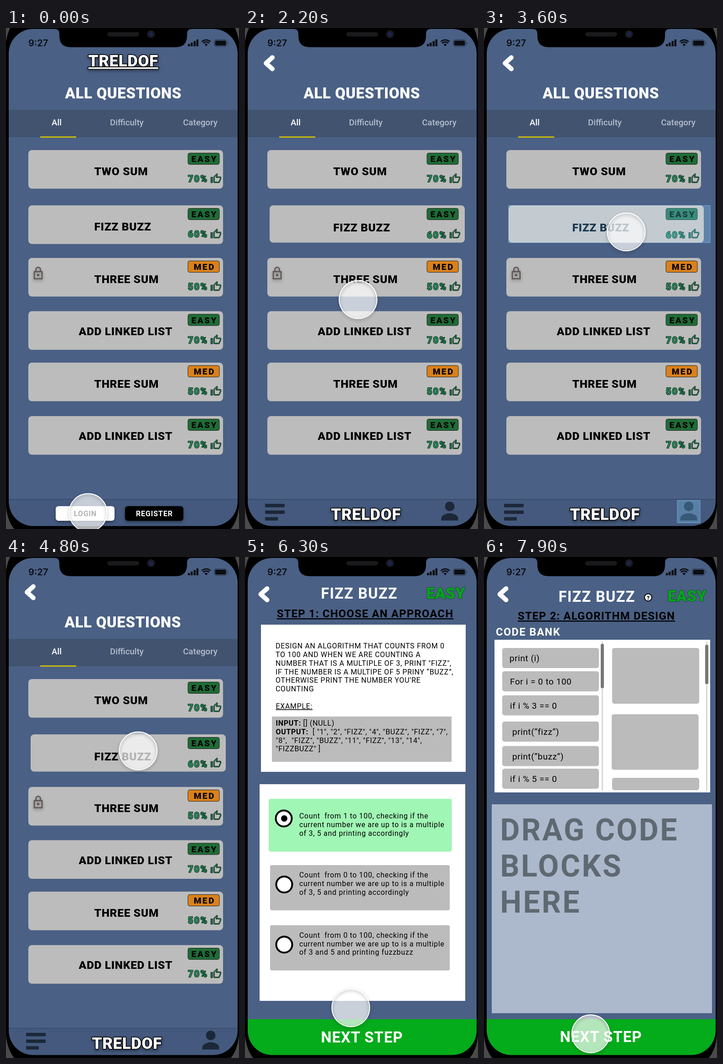
An HTML page for the animation above (8 s loop, 511 px wide and 1096 px high).

```html
<!DOCTYPE html>
<html lang="en">
<head>
<meta charset="utf-8">
<title>Coding practice app</title>
<style>
  html, body { margin: 0; width: 100%; height: 100%; overflow: hidden; background: #000; }
  svg { display: block; width: 100vw; height: 100vh; }
  text { font-family: Roboto, sans-serif; font-weight: 700; white-space: pre; }
  .reg { font-weight: 400; }
  .mid { font-weight: 500; }
  .black { font-weight: 900; }
  .line { text-decoration: underline; }
  .outline { paint-order: stroke; stroke: #000; stroke-linejoin: round; }
  .shadow { filter: drop-shadow(0 3px 3px #0006); }
  #hints { mix-blend-mode: screen; }
</style>
</head>
<body>
<svg id="stage" viewBox="0 0 511 1096" preserveAspectRatio="none"></svg>
<script>
const BLUE = '#4a6085', GREY = '#bbb', GREEN = '#04ab1b', BRAND = 'TRELDOF';

const rect = (x, y, x2, y2, fill, r = 0, extra = '') =>
  `<rect x="${x}" y="${y}" width="${x2 - x}" height="${y2 - y}" rx="${r}" fill="${fill}" ${extra}/>`;

const text = (x, y, size, str, { fill = '#000', gap = 0, cls = '', mid = false, extra = '' } = {}) =>
  `<text x="${mid ? x + gap / 2 : x}" y="${y}" font-size="${size}" fill="${fill}" letter-spacing="${gap}"
    class="${cls}" ${mid ? 'text-anchor="middle"' : ''} ${extra}>${str}</text>`;

const centered = (x, y, size, str, fill, gap, cls = '', extra = '') =>
  text(x, y, size, str, { fill, gap, cls, extra, mid: true });

const lines = (x, ys, size, strs, opts) => strs.map((s, i) => text(x, ys[i], size, s, opts)).join('');

const screen = (id, body) => `<g id="${id}">${rect(0, 0, 511, 1096, BLUE)}${body}</g>`;

const back = (x, y) =>
  `<path d="M${x} ${y}l-14 12.5 14 12.5" fill="none" stroke="#fff" stroke-width="10" stroke-linecap="round" stroke-linejoin="round"/>`;

const logo = (y, cls = '') => centered(cls ? 257 : 265, y, 35, BRAND, '#fff', .6, `black outline shadow ${cls}`, 'stroke-width="3"');

const thumb = y => `<path transform="translate(448 ${y}) scale(1.03)" fill="#1d6b45" stroke="#06180f" stroke-width=".7"
  d="M9 21h9c.8 0 1.5-.5 1.8-1.2l3-7c.1-.3.2-.5.2-.8v-2a2 2 0 0 0-2-2h-6.3l1-4.6v-.3c0-.4-.2-.8-.5-1L14.2 1 7.6 7.6C7.2 8 7 8.500 7 9v10a2 2 0 0 0 2 2zM9 9l4.300-4.300L12 10h9v2l-3 7H9zM1 9h4v12H1z"/>`;

const lock = `<g class="shadow" fill="none" stroke="#5c5050" stroke-width="2.500">
  <path d="M62 533h17v15.500h-17zM65.500 533v-4.500a5 5 0 0 1 10 0v4.500"/><circle cx="70.500" cy="540.500" r="1.300"/></g>`;

function card(y, title, level, liked, { moved = false } = {}) {
  const x = title.length > 9 ? 159.5 : 193.5, low = title.length > 9 ? 52 : 55, d = moved ? 1.5 : 0;
  return rect(moved ? 54 : 49, y, moved ? 482 : 476, y + (moved ? 81.5 : 84.5), '#bcbcbc', 8)
    + text(x, y + low + d, 24.5, title, { gap: .7, cls: 'black' })
    + rect(399, y + 6.5, 468, y + 31.5, level === 'EASY' ? '#1f6c36' : '#d9811a', 4, 'stroke="#222" stroke-width="1"')
    + centered(434, y + 26, 19, level, '#000', 2.5, 'black')
    + text(399, y + 70 + d, 20, liked + '%', { fill: '#1f8f58', gap: 2, cls: 'black outline', extra: 'stroke-width="1.6"' })
    + thumb(y + 50);
}

function questions(id, member) {
  const tabs = [[111, 'All', '#fff'], [265, 'Difficulty', '#b3bccb'], [426, 'Category', '#b3bccb']];
  const head = member ? back(60, 64.5) : logo(84, 'line');
  const foot = member
    ? rect(44, 1041, 87, 1048.5, '#1c2838') + rect(44, 1055.5, 87, 1063, '#1c2838') + rect(44, 1070, 72, 1077.5, '#1c2838')
      + '<path fill="#1c2838" d="M449 1036a10.500 10.500 0 0 1 0 21a10.500 10.500 0 0 1 0-21M430.500 1077.500v-5c0-7 11-11 18.500-11s18.500 4 18.500 11v5z"/>'
      + logo(1076)
    : rect(109, 1046, 238, 1078, '#fff', 6, 'class="shadow"') + centered(173.5, 1068, 16, 'LOGIN', '#000', .8)
      + rect(261, 1046, 389, 1078, '#000', 6, 'class="shadow"') + centered(325, 1068, 16, 'REGISTER', '#fff', .9);
  return screen(id, head
    + centered(member ? 256 : 257, 154, 33, 'ALL QUESTIONS', '#fff', .6, 'black')
    + rect(0, 179, 511, 239, '#41536f')
    + tabs.map(([x, s, c]) => centered(x, 213, 18.7, s, c, 0, 'mid')).join('')
    + rect(75, 237, 154, 240, '#c6b80c')
    + card(267, 'TWO SUM', 'EASY', 70)
    + card(388, 'FIZZ BUZZ', 'EASY', 60, { moved: member })
    + card(503, 'THREE SUM', 'MED', 50) + lock
    + card(619.5, 'ADD LINKED LIST', 'EASY', 70)
    + card(732, 'THREE SUM', 'MED', 50)
    + card(849, 'ADD LINKED LIST', 'EASY', 70)
    + rect(0, 1031, 511, 1096, '#44597d') + rect(0, 1030.5, 511, 1031.5, '#2f405c')
    + foot
    + (member ? `<path id="hints" fill="#1c3a50" stroke="#3c7fb0" d="M54 388.500h442v81h-442zM424 1033.500h50v49h-50z"/>` : ''));
}

const login = screen('login', back(70, 81)
  + centered(252, 236, 65, BRAND, '#fff', 2)
  + text(96, 412, 40, 'LOG IN', { fill: '#83c8ff', gap: 1.5 })
  + rect(75, 455, 461, 523, '#fff') + rect(76.5, 546, 462.5, 610, '#fff')
  + text(102, 496, 20, 'someone@sample.home', { cls: 'reg' })
  + '<path d="M105 583h78" stroke="#000" stroke-width="4.400" stroke-linecap="round" stroke-dasharray="0 7"/>'
  + rect(62, 645, 446, 715, '#000', 8)
  + centered(254, 687, 16.5, 'LOG IN', '#fff', 1.2));

const easy = (x, y) => centered(x, y, 33, 'EASY', '#08a51e', .8, 'black outline', 'stroke-width="1.5" style="stroke:#0a4a1c"');
const nextStep = y => rect(0, 1011, 511, 1096, GREEN) + centered(256, y, 33, 'NEXT STEP', '#fff', 1);
const body = { cls: 'reg', gap: .68 };

const radio = (x, y) => `<circle cx="${x}" cy="${y}" r="17.500" fill="#fff" stroke="#000" stroke-width="4"/>`;
const choice = (y, start, ending) => lines(119, [y, y + 19, y + 37.5], 16,
  [`Count  from ${start} to 100, checking if the`, 'current number we are up to is a multiple', ending], { cls: 'reg', gap: .7 });

const approach = screen('approach', back(48.5, 69)
  + centered(250, 91, 32.5, 'FIZZ BUZZ', '#fff', 1.3) + easy(440, 91)
  + centered(263, 132, 24, 'STEP 1: CHOOSE AN APPROACH', '#000', 1.15, 'line')
  + rect(35, 148, 484, 470, '#fff')
  + lines(67, [200, 219, 238, 256.5, 275, 294], 16, [
      'DESIGN AN ALGORITHM THAT COUNTS FROM 0', 'TO 100 AND WHEN WE ARE COUNTING A',
      'NUMBER THAT IS A MULTIPLE OF 3, PRINT "FIZZ",', 'IF THE NUMBER IS A MULTIPE OF 5 PRINY “BUZZ”,',
      'OTHERWISE PRINT THE NUMBER YOU’RE', 'COUNTING'], body)
  + text(67.5, 332, 16, 'EXAMPLE:', { cls: 'reg line', gap: .68 })
  + rect(59, 349, 453, 448, GREY)
  + lines(67.5, [369, 388, 406.5, 425], 16, [
      '<tspan font-weight="700">INPUT:</tspan> [] (NULL)',
      '<tspan font-weight="700">OUTPUT:</tspan>  [ "1", "2", "FIZZ", "4", "BUZZ", "FIZZ", "7",',
      '"8",  "FIZZ", "BUZZ", "11", "FIZZ", "13", "14",', '"FIZZBUZZ" ]'], body)
  + rect(32, 497, 483, 971, '#fff')
  + `<g id="open">${rect(55, 543, 449, 642, GREY, 4)}</g>`
  + `<g id="picked">${rect(52, 529, 453.5, 644.5, '#a0f6b4', 4)}</g>`
  + rect(55, 674, 449, 773, GREY, 4) + rect(55, 805.5, 449, 904.5, GREY, 4)
  + radio(85, 572) + radio(86, 716.5) + radio(86, 848)
  + '<circle id="dot" cx="86" cy="572" r="7"/>'
  + choice(572, 1, 'of 3, 5 and printing accordingly')
  + choice(701, 0, 'of 3, 5 and printing accordingly')
  + choice(832.5, 0, 'of 3 and 5 and printing fuzzbuzz')
  + nextStep(1062));

const blocks = [[199, 'print (i)', 56], [250, 'For i = 0 to 100', 57], [302.5, 'if i % 3 == 0', 57],
  [360, 'print(“fizz”)', 62], [413.5, 'print(“buzz”)', 62], [463, 'if i % 5 == 0', 57]];
const scrollbar = (x, top, bottom) => rect(x - 1.5, 185, x + 1.5, 511, '#d8d8d8', 1) + rect(x - 3.5, top, x + 3.5, bottom, '#777', 3);

const design = screen('design', back(48.5, 69)
  + centered(247, 97.5, 32.5, 'FIZZ BUZZ', '#fff', 1.3) + easy(445, 97)
  + '<circle cx="360" cy="88.500" r="8" fill="#fff" stroke="#000" stroke-width="2"/>'
  + centered(360, 93.5, 13, '?', '#000', 0)
  + centered(246, 137, 24, 'STEP 2: ALGORITHM DESIGN', '#000', 1.15, 'line')
  + text(26, 172, 23.5, 'CODE BANK', { fill: '#fff', gap: 1.5 })
  + rect(23, 181, 496, 515, '#fff')
  + blocks.map(([y, s, x]) => rect(40, y, 252, y + 44, GREY, 5) + text(x, y + 29, 19, s, { cls: 'reg', gap: .6 })).join('')
  + scrollbar(259.5, 190, 287) + scrollbar(488.5, 192, 278)
  + rect(281, 199, 472, 321, GREY, 5) + rect(280, 344, 470.5, 465.5, GREY, 5) + rect(281, 483, 472, 510, GREY, 5)
  + rect(17, 541, 500, 998, '#acb9cc')
  + lines(35.5, [620, 699, 778], 66, ['DRAG CODE', 'BLOCKS', 'HERE'], { fill: '#5f6972', gap: 3.6 })
  + nextStep(1061));

const phone = `
  <path d="M0 1046Q3 1078 18 1096H0zM511 1046Q508 1078 493 1096H511zM0 30Q3 12 9 0H0zM511 30Q508 12 502 0H511z" fill="#4a4a4a"/>
  <path d="M106 0V2Q117 2 117 13V17Q117 42 142 42H372Q397 42 397 17V13Q397 2 408 2V0z"/>
  ${rect(222, 9, 292, 18.5, '#1a1a1d', 4.7)}
  <circle cx="318" cy="13.500" r="8.500" fill="#1b1c22"/><circle cx="318" cy="13.500" r="4.500" fill="#1c2450"/>
  <text x="49" y="39.500" font-size="20" style="font-family:Inter,sans-serif;font-weight:600" fill="#0b0d12">9:27</text>
  <g fill="#0b0d12">
    <path d="M399 35h4.500v5h-4.500zM405 32h4.500v8h-4.500zM411.500 28.500h4.500v11.500h-4.500zM417.500 25h4.500v15h-4.500z"/>
    <path d="M439 40l-3.500-4a5 5 0 0 1 7 0z"/>
    <path d="M432.500 33.500a9 9 0 0 1 13 0M429.500 30a13.500 13.500 0 0 1 19 0" fill="none" stroke="#0b0d12" stroke-width="2.800"/>
    ${rect(458.5, 27.5, 482.5, 38.5, '#0b0d12', 2.5)}
    <path d="M486.500 30.500q3 2.500 0 5z" opacity=".5"/>
  </g>
  ${rect(456.5, 25.5, 484.5, 40.5, 'none', 4.5, 'stroke="#0b0d12" stroke-opacity=".5"')}`;

document.getElementById('stage').innerHTML = `
  <clipPath id="glass">${rect(6, 2, 508, 1089.5, '#fff', 54)}</clipPath>
  <g clip-path="url(#glass)">${questions('guest', false)}${login}${questions('member', true)}${approach}${design}</g>
  ${phone}
  <g id="touch">
    <circle r="41.500" fill="#fff" fill-opacity=".7"/>
    <circle r="41.500" fill="none" stroke="#fff" stroke-width="2" class="shadow"/>
  </g>`;

const $ = id => document.getElementById(id);
const show = (id, on) => $(id).style.display = on ? '' : 'none';
const clamp = v => Math.min(1, Math.max(0, v));

const LOOP = 8000, PICK = 5800;
const scenes = [['guest', 0], ['login', 300], ['member', 1500], ['approach', 5100], ['design', 6700]];
// Touch path: time, x, y
const path = [[0, 180, 1060], [300, 180, 1060], [900, 274, 616], [1200, 254, 682], [1600, 254, 682], [2200, 248, 594],
  [3000, 302, 462], [3600, 312, 446], [4200, 306, 440], [4800, 290, 424], [5100, 290, 424], [5550, 88, 575],
  [5850, 88, 575], [6300, 232, 986], [6550, 234, 1043], [LOOP, 234, 1043]];

function draw(t) {
  const current = scenes.filter(s => t >= s[1]).pop()[0];
  for (const [id] of scenes) show(id, id === current);
  show('open', t < PICK);
  show('picked', t >= PICK);
  show('dot', t >= PICK);
  $('hints').style.opacity = clamp((t - 3400) / 150) * clamp((4100 - t) / 200);

  const i = path.findIndex(p => p[0] > t);
  const [t0, x0, y0] = path[i - 1], [t1, x1, y1] = path[i];
  const k = (t - t0) / (t1 - t0), e = k * k * (3 - 2 * k);
  $('touch').setAttribute('transform', `translate(${x0 + (x1 - x0) * e} ${y0 + (y1 - y0) * e})`);
}

function tick() {
  draw(performance.now() % LOOP);
  requestAnimationFrame(tick);
}
tick();
</script>
</body>
</html>
```
